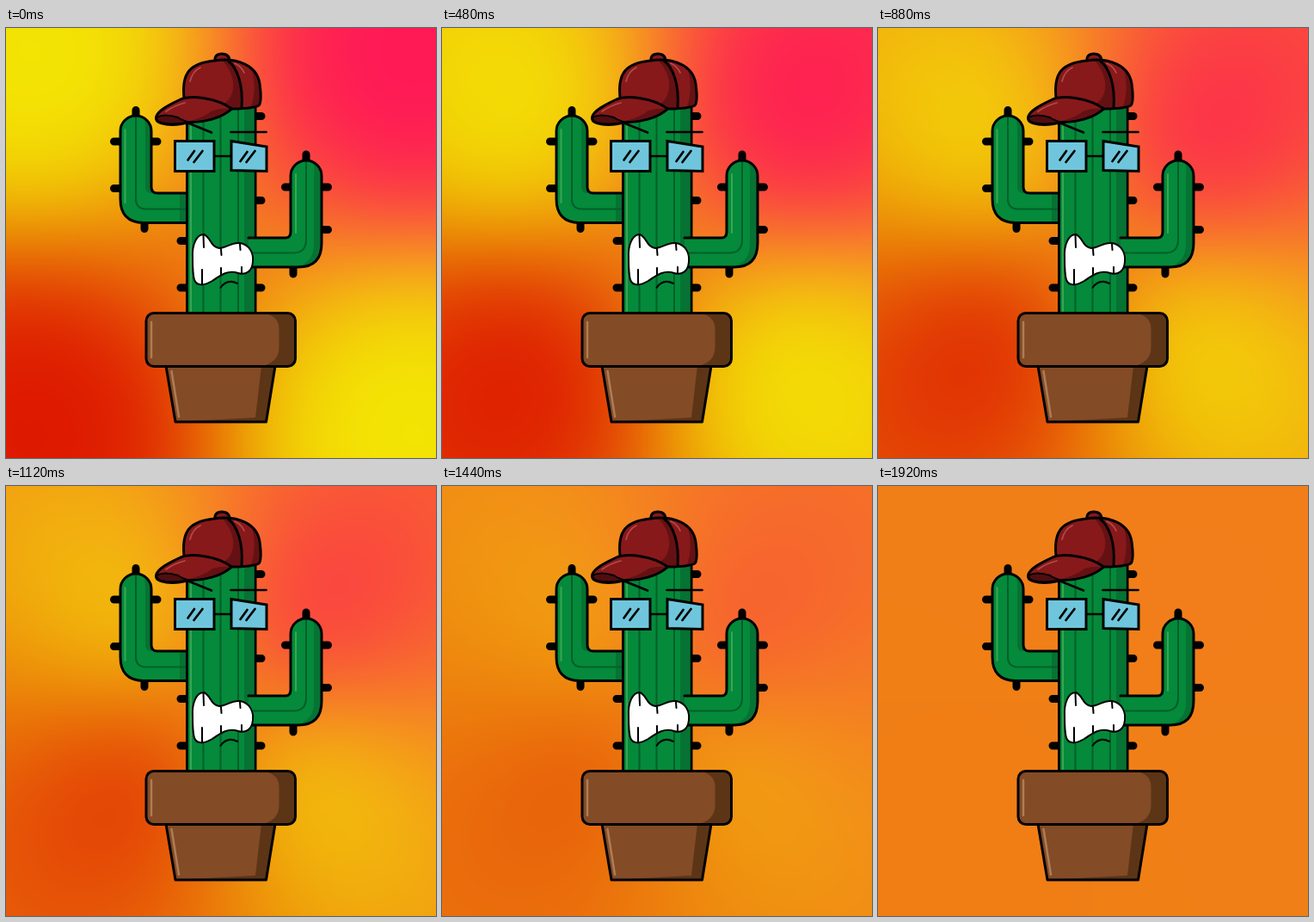
An HTML page with a canvas for the animation above (2000 ms loop, 500 px wide and 500 px high).

```html
<!DOCTYPE html>
<html lang="en">
<head>
<meta charset="utf-8">
<title>Cactus</title>
<style>
  html, body { margin: 0; width: 100%; height: 100%; overflow: hidden; background: #f07d15; }
  canvas, svg { position: absolute; left: 0; top: 0; width: 100vw; height: 100vh; display: block; }
  .ink { stroke: #000; stroke-width: 3; stroke-linejoin: round; stroke-linecap: round; }
  .line { fill: none; stroke: #000; stroke-width: 2.7; stroke-linecap: round; }
  .thin { stroke-width: 2; }
  .spines { fill: none; stroke: #000; stroke-width: 9; stroke-linecap: round; }
  .green { fill: #048a3a; }
  .shade { fill: #067233; }
  .rib { fill: none; stroke: #035f2b; stroke-width: 2; }
  .shine { fill: none; stroke: #3aa653; stroke-width: 2; stroke-linecap: round; }
  .clay { fill: #834b26; }
  .clay-dark { fill: #5c3516; }
  .clay-shine { fill: none; stroke: #ae7d55; stroke-width: 2.5; stroke-linecap: round; }
  .lens { fill: #6fc6dc; }
  .red { fill: #87191b; }
  .red-dark { fill: #651113; }
  .red-shine { fill: none; stroke: #b24a45; stroke-width: 1.8; stroke-linecap: round; }
</style>
</head>
<body>
<canvas id="sky" width="500" height="500"></canvas>
<svg viewBox="0 0 500 500">
  <path class="spines" d="M151 95.5V104M125.5 132H135M167 132H176M125.5 186.500H135M161 225V233.500
    M349 147V157M324.500 185H333M365 185H374.500M365 234.500H374.500M334 277V286
    M288 102.500H297M288 200.500H297M203 247.500H212M203 302H212M288 302H297"/>

  <!-- left arm -->
  <path class="green" d="M212 226.500H160Q133 226 133 199V120A18 18 0 0 1 169 120V185Q169 192 176 192H212Z"/>
  <path class="shade" d="M161 107Q169 111 169 122V185Q169 192 176 192H168Q162 191 162 184V122Q162 112 161 107ZM202 192H210V226H202Z"/>
  <path class="rib" d="M151 103V199Q151 210 162 210.500H210"/>
  <path class="shine" d="M138.500 118V203"/>
  <path class="ink" fill="none" d="M210 226.500H160Q133 226 133 199V120A18 18 0 0 1 169 120V185Q169 192 176 192H210"/>

  <!-- trunk -->
  <path class="green ink" d="M210.500 85H290V334H210.500Z"/>
  <path class="shade" d="M277 88H288.500V331H277Z"/>
  <path class="rib" d="M229.500 90V331M249.500 90V331M270 90V331"/>
  <path class="shine" d="M215 114V329"/>

  <!-- right arm -->
  <path class="green" d="M282 244H325Q331 244 331 237V172A18 18 0 0 1 367 172V250Q367 278 340 278H282Z"/>
  <path class="shade" d="M357 157Q367 162 367 174V250Q367 278 338 278Q358 272 358 252V172Q359 163 357 157Z"/>
  <path class="rib" d="M349 155V246Q349 261 335 261.500H287"/>
  <path class="shine" d="M337 170V238"/>
  <path class="ink" fill="none" d="M282 244H325Q331 244 331 237V172A18 18 0 0 1 367 172V250Q367 278 340 278H284"/>

  <!-- pot -->
  <path class="clay" d="M186 393L197 458H302.500L313 393Z"/>
  <path class="clay-dark" d="M297 393H313L302.500 458H197L290 453Z"/>
  <path class="clay-shine" d="M192.500 399L201 452"/>
  <path class="ink" fill="none" d="M186 393L197 458H302.500L313 393"/>
  <rect class="clay" x="163" y="331.500" width="173.500" height="62" rx="9"/>
  <path class="clay-dark" d="M298 331.500Q317.500 334 317.500 350V371Q317.500 390 295 393.500H327.500Q336.500 393.500 336.500 384V341Q336.500 331.500 327.500 331.500Z"/>
  <path class="clay-shine" d="M169 342V383"/>
  <rect class="ink" fill="none" x="163" y="331.500" width="173.500" height="62" rx="9"/>

  <!-- mouth -->
  <path class="ink thin" fill="#fff" d="M217 268C216 251 222 240 230 240C238 243 238 255 248 256C256 256 262 249 272 250C284 252 288 263 287 272C286 284 278 287.500 270 285C258 281 250 287 240 294C230 300 222 300 219 293C217 286 217 277 217 268Z"/>
  <path class="line thin" d="M229.500 241L230 255M250 257L250.500 264M272 251L272.500 258M228 281V298M250 279V287M274 278V285M249.500 302Q257 291 269 297"/>

  <!-- brows and glasses -->
  <path class="line" d="M213 111L239 121.500M261.500 121H302.500M242 149H262"/>
  <path class="lens ink" style="stroke-linejoin: miter" d="M196.500 131.500H242V166.500H196.500ZM262 131.500L303 138V166.500L262 165.500Z"/>
  <path class="line" d="M211.500 153.500L219 143M218.500 156L228.500 143M272.500 155L280.500 144M279.500 156L289.500 143"/>

  <!-- cap -->
  <path class="red ink" d="M243 39Q242 30 251 30Q260 30 260 39Z"/>
  <path class="red" d="M207 81C204 52 214 41 242 38C270 34 292 44 295 65C297 80 296 88 294 90C287 94 272 94 262 94Z"/>
  <path class="red-dark" d="M258 38C269 46 276 66 274 93L262 94L254 88C268 78 268 56 252 38ZM286 48Q297 64 295 89L285 92Q292 70 286 48Z"/>
  <path class="red-shine" d="M214 62Q217 50 226 46M266 41Q274 45 277 52"/>
  <path class="ink" fill="none" d="M207 81C204 52 214 41 242 38C270 34 292 44 295 65C297 80 296 88 294 90C287 94 272 94 262 94M258 38C269 46 276 66 274 93"/>
  <path class="red ink" d="M174.500 104C176 96 190 89 203 83C215 78 245 81 262.500 94C250 105 230 110 213 109.500C200 113 188 113 180 110.500C175 109 174 107 174.500 104Z"/>
  <path class="red-dark" d="M260 94C248 104 230 108 213 108Q230 104 240 96Q250 93 260 94Z"/>
  <path class="ink thin" fill="#4f0d10" d="M175 104Q184 99 200 104Q204 107 212 109.500C200 112 188 112 180 110Q175 108 175 104Z"/>
  <path class="red-shine" d="M186 97Q196 90 208 87"/>
</svg>
<script>
  const SIZE = 500, LOOP = 2000, STEP = 80, MID = SIZE / 2;
  // Direction from the middle, then colour
  const spots = [
    { x: -1, y: -1, rgb: [243, 231, 3] },
    { x: 1, y: -1, rgb: [255, 22, 87] },
    { x: -1, y: 1, rgb: [221, 22, 0] },
    { x: 1, y: 1, rgb: [243, 231, 3] }
  ];
  const ctx = document.getElementById('sky').getContext('2d');
  const image = ctx.createImageData(SIZE, SIZE);

  // Blend the colours by softened inverse distance to each spot
  function paint(t) {
    const reach = 214 * (1 - t / LOOP);
    const soft = 8000 + 10 * t;
    const px = image.data;
    let i = 0;
    for (let y = 0; y < SIZE; y++) {
      for (let x = 0; x < SIZE; x++) {
        let sum = 0, r = 0, g = 0, b = 0;
        for (const s of spots) {
          const dx = x - MID - s.x * reach, dy = y - MID - s.y * reach;
          const d = dx * dx + dy * dy + soft;
          const w = 1 / (d * Math.sqrt(d));
          sum += w;
          r += w * s.rgb[0];
          g += w * s.rgb[1];
          b += w * s.rgb[2];
        }
        px[i++] = r / sum;
        px[i++] = g / sum;
        px[i++] = b / sum;
        px[i++] = 255;
      }
    }
    ctx.putImageData(image, 0, 0);
  }

  const start = performance.now();
  let shown = -1;
  function tick() {
    const t = Math.floor((performance.now() - start) % LOOP / STEP) * STEP;
    if (t !== shown) paint(shown = t);
    requestAnimationFrame(tick);
  }
  tick();
</script>
</body>
</html>
```
